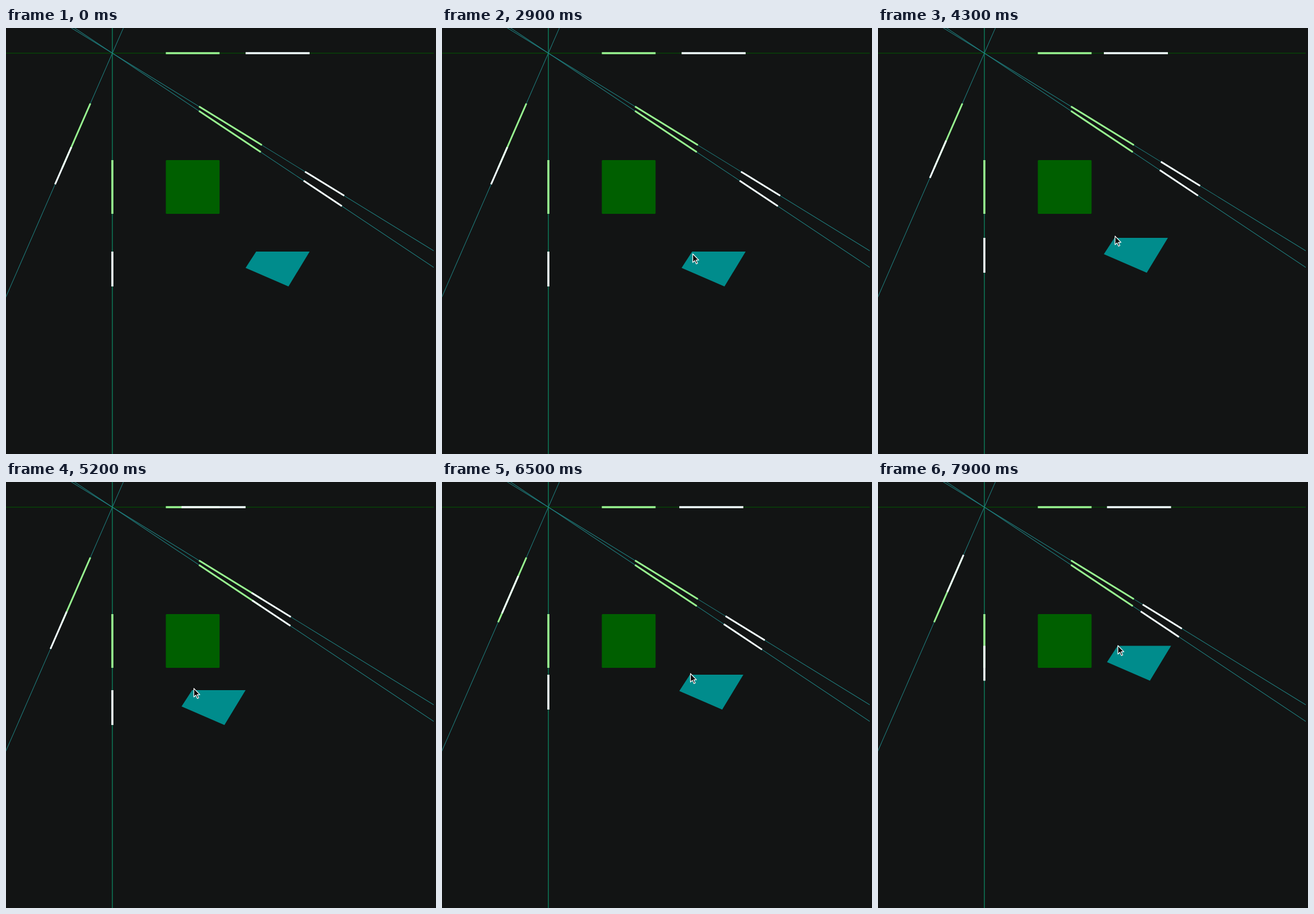
An HTML page without scripts for the animation above (8000 ms loop, 752x745 px).

```html
<!DOCTYPE html>
<html lang="en">
<head>
<meta charset="utf-8">
<title>Separating axes</title>
<style>
  /* --x, --y: drag offset of the quad; --cx, --cy: pointer offset from its corner */
  @property --x  { syntax: "<number>"; inherits: true; initial-value: 0; }
  @property --y  { syntax: "<number>"; inherits: true; initial-value: 0; }
  @property --cx { syntax: "<number>"; inherits: true; initial-value: 400; }
  @property --cy { syntax: "<number>"; inherits: true; initial-value: 400; }

  html, body {
    margin: 0;
    width: 100%;
    height: 100%;
    overflow: hidden;
    background: #121414;
  }
  svg {
    display: block;
    overflow: hidden;
    animation: drag 8s step-end infinite;
  }
  .axis {
    transform: translate(186px, 44px) rotate(var(--a));
    stroke: #1f8080;
    stroke-width: 1;
  }
  .axis .a, .axis .b { stroke-width: 3; }
  .axis.main .a, .axis.main .b { stroke-width: 3.6; }
  .a { stroke: #98f590; }
  .b {
    stroke: #f2ffff;
    transform: translateX(calc(1px * (var(--x) * cos(var(--a)) + var(--y) * sin(var(--a)))));
  }
  .quad { transform: translate(calc(var(--x) * 1px), calc(var(--y) * 1px)); }
  .pointer {
    transform: translate(calc(1px * (437 + var(--x) + var(--cx))),
                         calc(1px * (391 + var(--y) + var(--cy))));
  }

  @keyframes drag {
    0%     { --x: 0; --y: 0; --cx: 400; --cy: 400; }
    /* pointer comes in */
    26.25% { --x: 0; --y: 0; --cx: 262; --cy: 272; animation-timing-function: steps(2); }
    28.75% { --x: 0; --y: 0; --cx: 165; --cy: 180; animation-timing-function: steps(3); }
    32.5%  { --x: 0; --y: 0; --cx: 42; --cy: 50; animation-timing-function: steps(3); }
    36.25% { --x: 0; --y: 0; --cx: 1; --cy: 4; }
    /* quad is dragged about */
    37.5%  { --x: 0; --y: 0; --cx: 1; --cy: 4; animation-timing-function: steps(3); }
    41.25% { --x: 58; --y: 6; --cx: 2; --cy: -2; animation-timing-function: steps(2); }
    43.75% { --x: 30; --y: -6; --cx: -3; --cy: -3; animation-timing-function: steps(3); }
    47.5%  { --x: -60; --y: -20.5; --cx: -3; --cy: -3; animation-timing-function: steps(2); }
    50%    { --x: -66; --y: -24; --cx: 1; --cy: -3; animation-timing-function: steps(3); }
    53.75% { --x: -24; --y: -24; --cx: 1; --cy: -3; animation-timing-function: steps(4); }
    58.75% { --x: -113; --y: -27; --cx: 1; --cy: -3; }
    65%    { --x: -112; --y: -27; --cx: 3; --cy: -3; animation-timing-function: steps(7); }
    73.75% { --x: -53; --y: -39.5; --cx: 2; --cy: -2; animation-timing-function: steps(1); }
    75%    { --x: -44; --y: -41; --cx: 2; --cy: -2; animation-timing-function: steps(5); }
    81.25% { --x: -4; --y: -54; --cx: 1; --cy: -2; animation-timing-function: steps(4); }
    86.25% { --x: -16; --y: -84; --cx: 1; --cy: -2; animation-timing-function: steps(1); }
    87.5%  { --x: -19.5; --y: -92.5; --cx: 0.5; --cy: -2.5; animation-timing-function: steps(4); }
    92.5%  { --x: -18.5; --y: -103.5; --cx: 0.5; --cy: -1; }
    96.25% { --x: -18.5; --y: -103.5; --cx: 0.5; --cy: -1; animation-timing-function: steps(2); }
    98.75%, 100% { --x: -18.5; --y: -104.5; --cx: 0.5; --cy: -0.5; }
  }
</style>
</head>
<body>
<svg width="748" height="745" viewBox="0 0 748 745">
  <rect x="279.5" y="231" width="94" height="94" rx="1.5" fill="#005f00"/>
  <path class="quad" d="M437.5 391H531L494 452L419 419.5Z" fill="#008c8c"/>

  <g class="axis main" style="--a: 0deg">
    <path d="M-186 0H562" stroke="#005a00"/>
    <path class="a" d="M93.5 0H187.5"/>
    <path class="b" d="M233 0H345"/>
  </g>
  <g class="axis main" style="--a: 90deg">
    <path d="M-44 0H701" stroke="#0e7a58" stroke-width="1.5"/>
    <path class="a" d="M187 0H281"/>
    <path class="b" d="M347 0H408"/>
  </g>
  <g class="axis" style="--a: 31.59deg">
    <path d="M-99 0H700"/>
    <path class="a" d="M178 0H307"/>
    <path class="b" d="M395.5 0H476"/>
  </g>
  <g class="axis" style="--a: 33.69deg">
    <path d="M-99 0H700"/>
    <path class="a" d="M182 0H312"/>
    <path class="b" d="M402 0H482.4"/>
  </g>
  <g class="axis" style="--a: 113.59deg">
    <path d="M-99 0H700"/>
    <path class="a" d="M96 0H219.6"/>
    <path class="b" d="M179.3 0H250.4"/>
  </g>

  <path class="pointer" d="M0.5 0V15L4 11.8L6.6 17.6L9 16.5L6.4 10.9H11Z"
        fill="#080808" stroke="#fff" stroke-width="1.2" stroke-linejoin="round"/>
</svg>
</body>
</html>
```
